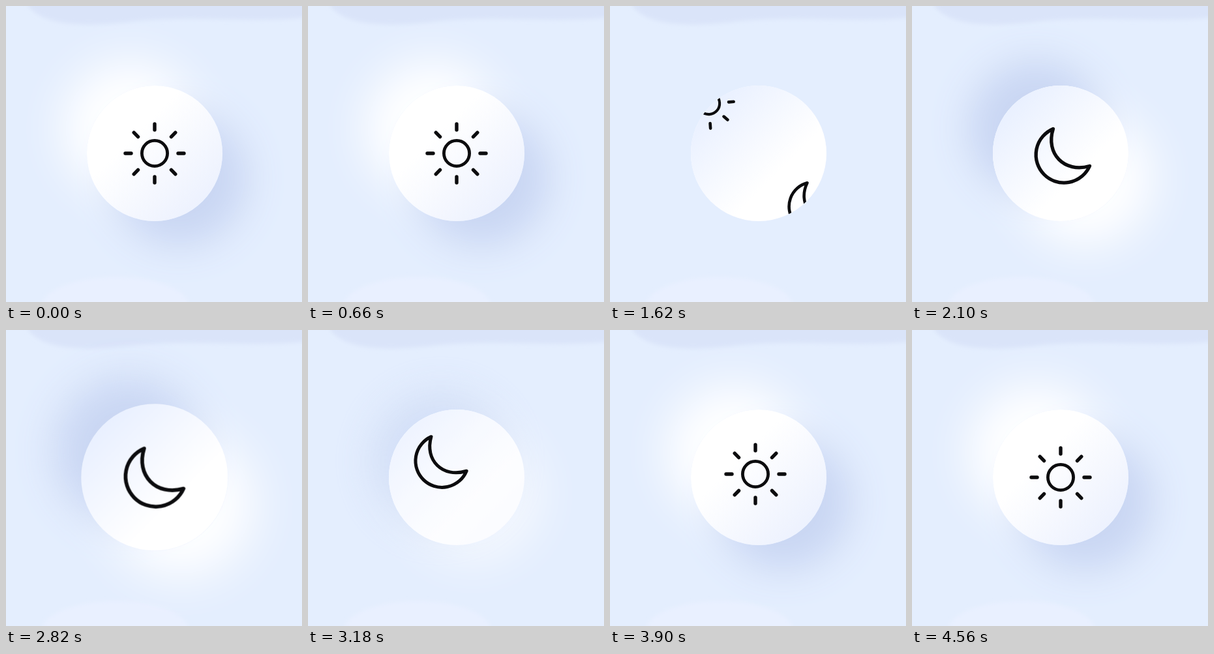
An HTML page without scripts for the animation above (4.62 s loop, 454 by 454 pixels).

```html
<!DOCTYPE html>
<html lang="en">
<head>
<meta charset="utf-8">
<title>Sun and moon toggle</title>
<style>
  :root {
    --bg: #e4eefe;
    --ink: #0c0c0e;
    --dark: #c9d6f3;
    --loop: 4620ms linear infinite;
  }
  html, body {
    margin: 0;
    width: 100%;
    height: 100%;
    overflow: hidden;
    background: var(--bg);
  }
  .backdrop {
    position: absolute;
    left: 0;
    top: 0;
    width: 454px;
    height: 454px;
  }
  .button {
    position: absolute;
    left: 124px;
    top: 122px;
    width: 208px;
    height: 208px;
    border-radius: 50%;
    overflow: hidden;
    background: linear-gradient(135deg, #fff 36%, #ecf1fe 88%);
    animation: press var(--loop), shade var(--loop);
  }
  .night {
    position: absolute;
    inset: 0;
    background: linear-gradient(135deg, #e9f0ff 14%, #fff 64%);
    animation: flip var(--loop);
  }
  .icons {
    position: absolute;
    inset: 0;
    fill: none;
    stroke: var(--ink);
    stroke-linecap: round;
    stroke-linejoin: round;
  }
  .sun { animation: sun var(--loop); }
  .moon { animation: moon var(--loop); }

  @keyframes press {
    0%, 23.4% { scale: 1; }
    27.27% { scale: 1.05; }
    29.2%, 31.2% { scale: 1.08; }
    33.8%, 56.3% { scale: 1; }
    61%, 65% { scale: 1.08; }
    67.5%, 100% { scale: 1; }
  }
  @keyframes shade {
    0%, 32.47%, 84%, 100% {
      box-shadow: 38px 38px 60px var(--dark), -38px -38px 70px #fff;
    }
    35.06%, 70.56% {
      box-shadow: 0 0 60px #c9d6f300, 0 0 70px #fff0;
    }
    42%, 67.97% {
      box-shadow: -38px -38px 60px var(--dark), 38px 38px 70px #fff;
    }
    75.32% {
      box-shadow: 43px 43px 60px var(--dark), -43px -43px 70px #fff;
    }
  }
  @keyframes flip {
    0%, 32.47% { opacity: 0; }
    35.06%, 67.97% { opacity: 1; }
    71.5%, 100% { opacity: 0; }
  }
  /* Both icons ride one diagonal strip, 159px apart */
  @keyframes sun {
    0%, 32.47% { translate: 0 0; scale: 1; rotate: 0deg; }
    33.77% { translate: -35px -35px; scale: .92; rotate: -2deg; }
    35.06% { translate: -76px -76px; scale: .85; rotate: -4deg; }
    36.36% { translate: -102px -102px; scale: .88; rotate: -3deg; }
    39.83% { translate: -134px -134px; }
    45.45%, 56.3% { translate: -159px -159px; scale: 1; rotate: 0deg; }
    56.31%, 67.97% { translate: 159px 159px; scale: 1; rotate: 0deg; }
    69.26% { translate: 124px 124px; scale: .92; rotate: 4deg; }
    70.56% { translate: 83px 83px; scale: .85; rotate: 8deg; }
    71.86% { translate: 57px 57px; scale: .9; rotate: 4deg; }
    73.59% { translate: 38px 38px; scale: .95; rotate: 1deg; }
    75.32% { translate: 25.5px 25.5px; scale: .98; rotate: 0deg; }
    79.22% { translate: 10px 10px; scale: 1; rotate: 0deg; }
    80.95% { translate: 4px 4px; }
    84.42% { translate: -5px -5px; }
    88.74% { translate: -1px -1px; }
    92.21% { translate: 1.5px 1.5px; }
    98.7%, 100% { translate: 0 0; scale: 1; rotate: 0deg; }
  }
  @keyframes moon {
    0%, 32.47% { translate: 159px 159px; scale: 1; rotate: 0deg; }
    33.77% { translate: 124px 124px; scale: .92; rotate: 4deg; }
    35.06% { translate: 83px 83px; scale: .87; rotate: 8deg; }
    36.36% { translate: 57px 57px; scale: .9; rotate: 4deg; }
    39.83% { translate: 25px 25px; scale: .98; rotate: 0deg; }
    41.56% { translate: 15px 15px; scale: 1; rotate: 0deg; }
    43.72% { translate: 7px 7px; }
    45.45% { translate: 3.5px 3.5px; }
    49.35% { translate: -1.5px -1.5px; }
    54.55%, 67.97% { translate: 0 0; scale: 1; rotate: 0deg; }
    69.26% { translate: -35px -35px; scale: .92; rotate: -2deg; }
    70.56% { translate: -76px -76px; scale: .85; rotate: -4deg; }
    71.86% { translate: -102px -102px; scale: .9; rotate: -3deg; }
    75.32% { translate: -134px -134px; }
    80.95%, 100% { translate: -159px -159px; scale: 1; rotate: 0deg; }
  }
</style>
</head>
<body>
<svg class="backdrop" viewBox="0 0 454 454">
  <defs>
    <filter id="soft" x="-20%" y="-50%" width="140%" height="200%">
      <feGaussianBlur stdDeviation="3"/>
    </filter>
  </defs>
  <g filter="url(#soft)">
    <path fill="#dae4f9" d="M34-20V0C60 33 130 32 200 23C300 14 390 28 474 16V-20Z"/>
    <ellipse cx="168" cy="460" rx="112" ry="44" fill="#e9f0ff"/>
  </g>
</svg>
<div class="button">
  <div class="night"></div>
  <svg class="icons" viewBox="-104 -104 208 208">
    <defs>
      <path id="rays" d="M0-45V-36M0 36V45M-45 0H-36M36 0H45"/>
    </defs>
    <g class="sun" stroke-width="5.4">
      <circle r="19.6" stroke-width="4.8"/>
      <use href="#rays"/>
      <use href="#rays" transform="rotate(45)"/>
    </g>
    <g class="moon" stroke-width="5.3">
      <path d="M-15-41A43 43 0 1 0 41 16C2 27-27-3-15-41Z"/>
    </g>
  </svg>
</div>
</body>
</html>
```
